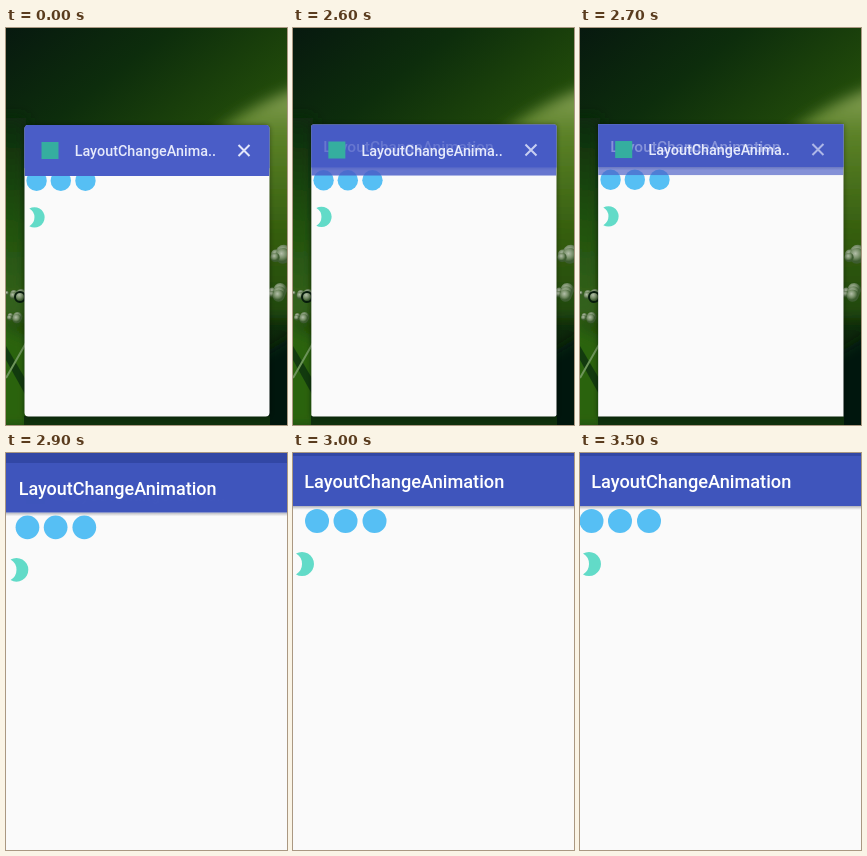
These frames come from a looping animation (281x397 px, 3900 ms). An HTML page:

```html
<!DOCTYPE html>
<html lang="en">
<head>
<meta charset="utf-8">
<title>LayoutChangeAnimation</title>
<style>
html, body { margin: 0; width: 100%; height: 100%; overflow: hidden; background: #08200f; }
svg { display: block; width: 100vw; height: 100vh; }
text { font: 500 18.2px Roboto, sans-serif; fill: #fff; }
#card text { font-size: 14.35px; fill: #e6eafb; }
</style>
</head>
<body>
<svg viewBox="0 0 281 397">
  <defs>
    <linearGradient id="night" x2=".55" y2="1">
      <stop stop-color="#07190f"/><stop offset=".25" stop-color="#0d2d0c"/>
      <stop offset=".55" stop-color="#234d0a"/><stop offset="1" stop-color="#0d290b"/>
    </linearGradient>
    <linearGradient id="leaf" x2="0" y2="1">
      <stop stop-color="#8aa35c"/><stop offset=".2" stop-color="#5c8228"/>
      <stop offset=".6" stop-color="#376010"/><stop offset="1" stop-color="#1f460c"/>
    </linearGradient>
    <linearGradient id="side" x2="0" y2="1">
      <stop stop-color="#0c2a0d"/><stop offset=".5" stop-color="#1f500b"/><stop offset="1" stop-color="#37641f"/>
    </linearGradient>
    <radialGradient id="drop" cx=".4" cy=".35">
      <stop stop-color="#b3bfa9"/><stop offset=".6" stop-color="#758d66"/><stop offset="1" stop-color="#3d5c30"/>
    </radialGradient>
    <linearGradient id="shade" x2="0" y2="1">
      <stop stop-color="#6d7182" stop-opacity=".55"/><stop offset="1" stop-color="#999" stop-opacity="0"/>
    </linearGradient>
    <filter id="soft" x="-20%" y="-20%" width="140%" height="140%"><feGaussianBlur stdDeviation="7"/></filter>
    <filter id="glow"><feGaussianBlur stdDeviation="2.5"/></filter>
    <clipPath id="clip"><rect class="win"/></clipPath>
  </defs>

  <path d="M0 0H281V397H0Z" fill="url(#night)"/>
  <g filter="url(#soft)">
    <path d="M300 58Q240 76 190 120L200 290H300Z" fill="url(#leaf)"/>
    <path d="M-20 90H20V290H-20Z" fill="url(#side)"/>
    <path d="M-20 290L25 310V400H-20Z" fill="#2b6411"/>
    <path d="M250 330L300 300V410H250Z" fill="#06170a"/>
  </g>
  <path d="M0 318L20 352V368L0 332Z" fill="#123a0e"/>
  <path d="M0 350L20 315" stroke="#6d955a" stroke-width="2"/>
  <path d="M18 397V388H264V397Z" fill="#0f300d"/>
  <g id="drops" fill="url(#drop)"></g>
  <circle cx="14" cy="269" r="5" fill="none" stroke="#071c0c" stroke-width="2"/>

  <rect class="win" opacity=".45" filter="url(#glow)"/>
  <g clip-path="url(#clip)">
    <rect width="281" height="397" fill="#fafafa"/>
    <g id="app">
      <path d="M-30 53H320V57H-30Z" fill="url(#shade)"/>
      <path d="M-30 3H320V53H-30Z" fill="#3f55bc"/>
      <path d="M-30 -12H320V3H-30Z" fill="#3247a5"/>
      <text x="11.2" y="35">LayoutChangeAnimation</text>
      <g id="dots" fill="#56bff4">
        <circle cx="11.5" cy="68" r="12"/><circle cx="40" cy="68" r="12"/><circle cx="69" cy="68" r="12"/>
      </g>
      <path d="M3 100.6A12 12 0 1 1 3 121.4A12 12 0 0 0 3 100.6Z" fill="#62dbc8"/>
    </g>
    <g id="card">
      <rect class="fade" width="245" height="51" fill="#4a5dc7"/>
      <rect x="17" y="17" width="17" height="17" fill="#35ae9f"/>
      <text x="50.2" y="31">LayoutChangeAnima..</text>
      <path class="fade" d="M214 20L225 31M225 20L214 31" stroke="#e2e6fa" stroke-width="2"/>
    </g>
  </g>
</svg>
<script>
const LOOP = 3900, STEP = 100, LIFT = 2500, OPEN = 2700, OPENED = 3000, REST = 3500;
const $ = id => document.getElementById(id);
const set = (el, attrs) => { for (const k in attrs) el.setAttribute(k, attrs[k]); };
const setAll = (sel, attrs) => document.querySelectorAll(sel).forEach(el => set(el, attrs));
const lerp = (a, b, k) => a + (b - a) * k;
const span = (t, a, b) => Math.min(1, Math.max(0, (t - a) / (b - a)));
const move = (x, y, s = 1) => `translate(${x} ${y}) scale(${s})`;

// exponential approach, trimmed to reach 0 at p = 1
const decay = p => (.036 ** p - .036) / (1 - .036);

// dew drops scattered down both edges
for (let i = 0; i < 18; i++) {
  const a = i * .618 % 1, b = i * .755 % 1, right = i % 2;
  const drop = document.createElementNS('http://www.w3.org/2000/svg', 'circle');
  set(drop, {
    cx: right ? 265 + 15 * a : 1 + 15 * a,
    cy: right ? 205 + 75 * b : 265 + 45 * b,
    r: right ? 3 + 6 * a : 2 + 4 * a
  });
  $('drops').append(drop);
}

function draw(now) {
  const t = Math.floor(now % LOOP / STEP) * STEP;
  const lift = span(t, LIFT, LIFT + 600);
  const small = decay(span(t, OPEN, OPENED)); // 1 = card, 0 = full screen
  const edge = small ** 1.25;
  const top = 97 - 3 * lift;
  const x = lerp(-.75, 18.5 - lift, edge), y = lerp(-4, top, edge);
  const width = lerp(281.8, 263.5, edge) - x;

  setAll('.win', { x, y, width, height: lerp(430, 388.5, edge) - y, rx: Math.max(0, 4 - 12 * lift) });
  set($('app'), { transform: move(20.8 * small, (top - 2) * small, lerp(1, .85, small)) });
  set($('card'), { transform: move(x, lerp(6, top, small), width / 245), opacity: small ** 2 });
  setAll('.fade', { opacity: 1 - lift });
  const shift = 14 * Math.sin(Math.PI * span(t, OPEN, REST)) ** 1.4;
  set($('dots'), { transform: move(t < REST ? shift : 0, 0) });
}

let start;
function tick(now) {
  start ??= now;
  draw(now - start);
  requestAnimationFrame(tick);
}
draw(0);
requestAnimationFrame(tick);
</script>
</body>
</html>
```
